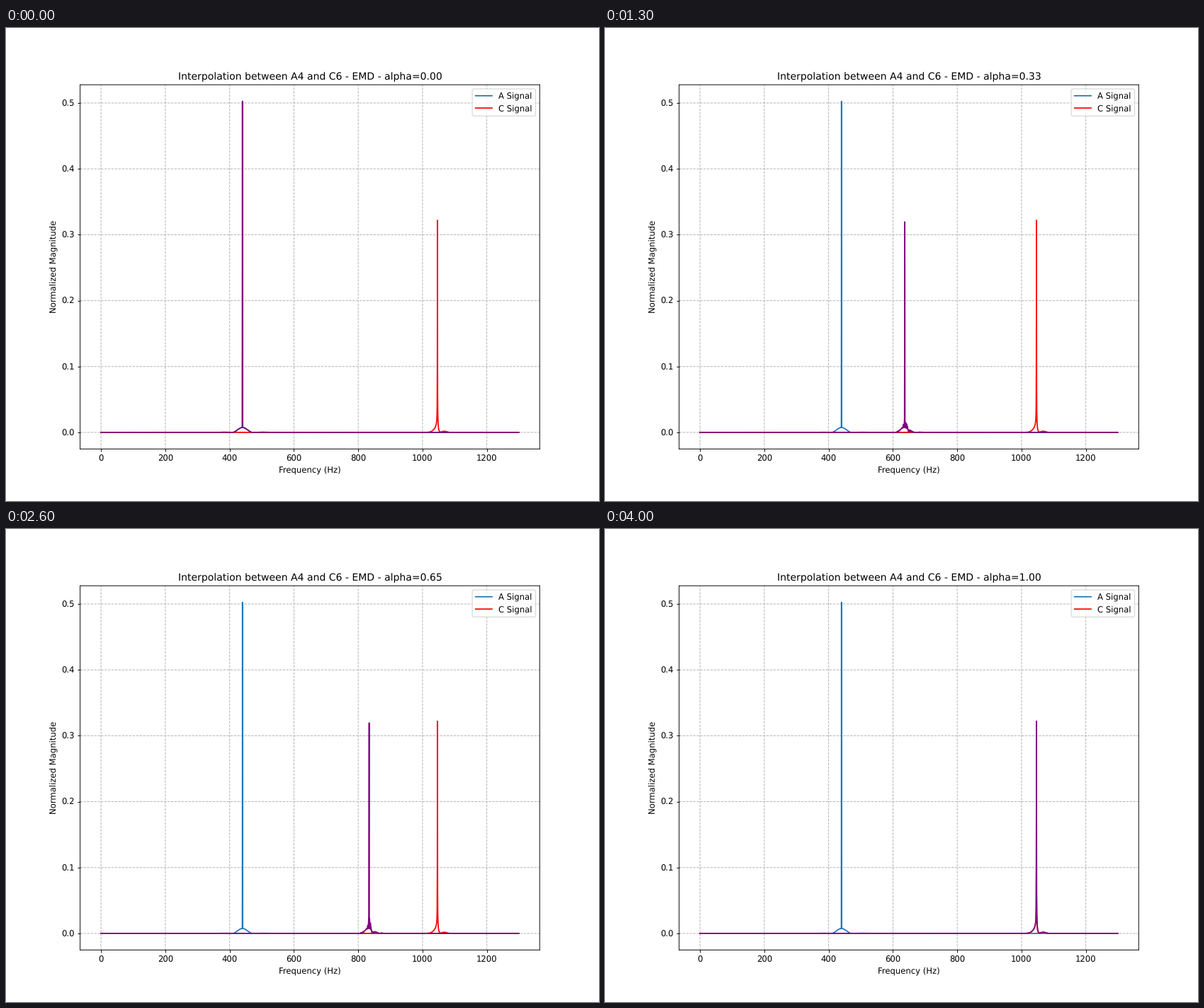
Recreate the animation shown at these times as a matplotlib script. Size 837x669 px, loop 4100 ms.

```python
import numpy as np
import matplotlib.pyplot as plt
from matplotlib.animation import FuncAnimation

# Unhinted text and unsnapped lines keep a 10 x 8 inch layout in proportion
plt.rcParams.update({"text.hinting": "none", "path.snap": False})

WIDTH, HEIGHT, DPI = 837, 669, 83.7
FRAMES, INTERVAL = 41, 100
BIN_HZ = 0.5
A_BIN, C_BIN = 880, 2093
bins = np.arange(2600)
freqs = bins * BIN_HZ


def spectrum(center, shape, left, right):
    """Scale the skirts so each side sums to its share; the peak takes the rest."""
    mags = shape.copy()
    mags[:center] *= left / shape[:center].sum()
    mags[center + 1:] *= right / shape[center + 1:].sum()
    mags[center] = 1 - left - right
    return mags


def a_signal():
    d = np.abs(bins - A_BIN)
    bump = 0.0074 * np.cos(np.pi / 2 * np.minimum(d / 64, 1)) ** 2
    lobes = 0.0003 * np.exp(-((d - 120) / 25) ** 2)
    return spectrum(A_BIN, bump + lobes, 0.2485, 0.249)


def c_signal():
    offset = bins - C_BIN
    d = np.maximum(np.abs(offset), 1)
    left = (0.052 * d ** -0.8 * np.exp(-(d / 40) ** 2)
            + 0.29 * np.exp(-1.8 * d)
            + 0.003 * np.exp(-(d / 28) ** 2))
    right = (0.065 / d * np.exp(-(d / 11) ** 2)
             + 0.0019 * np.exp(-((d - 42) / 20) ** 2))
    skirts = np.where(offset < 0, left, right) + 0.00001
    return spectrum(C_BIN, skirts, 0.439, 0.239)


def transport_plan(p, q):
    """Monotone optimal transport: source bin, target bin and mass of each piece."""
    cum_p, cum_q = np.cumsum(p), np.cumsum(q)
    edges = np.sort(np.concatenate(([0], cum_p, cum_q)))
    mids = (edges[1:] + edges[:-1]) / 2
    last = len(p) - 1
    src = np.minimum(np.searchsorted(cum_p, mids), last)
    dst = np.minimum(np.searchsorted(cum_q, mids), last)
    return src, dst, np.diff(edges)


a_mags, c_mags = a_signal(), c_signal()
src, dst, mass = transport_plan(a_mags, c_mags)


def interpolate(alpha):
    landed = ((1 - alpha) * src + alpha * dst).astype(int)
    return np.bincount(landed, weights=mass, minlength=len(bins))


# The tiny margin keeps the pixel size from being truncated
fig, ax = plt.subplots(figsize=((WIDTH + 1e-6) / DPI, (HEIGHT + 1e-6) / DPI), dpi=DPI)
ax.plot(freqs, a_mags, label="A Signal")
ax.plot(freqs, c_mags, color="red", label="C Signal")
blend, = ax.plot(freqs, a_mags, color="purple")
ax.set_xlabel("Frequency (Hz)")
ax.set_ylabel("Normalized Magnitude")
ax.grid(linestyle="--")
ax.legend(loc="upper right")
title = ax.set_title("")


def update(i):
    alpha = i / (FRAMES - 1)
    blend.set_ydata(interpolate(alpha))
    title.set_text(f"Interpolation between A4 and C6 - EMD - alpha={alpha:.2f}")
    return blend, title


anim = FuncAnimation(fig, update, frames=FRAMES, interval=INTERVAL, repeat=True)
plt.show()
```
